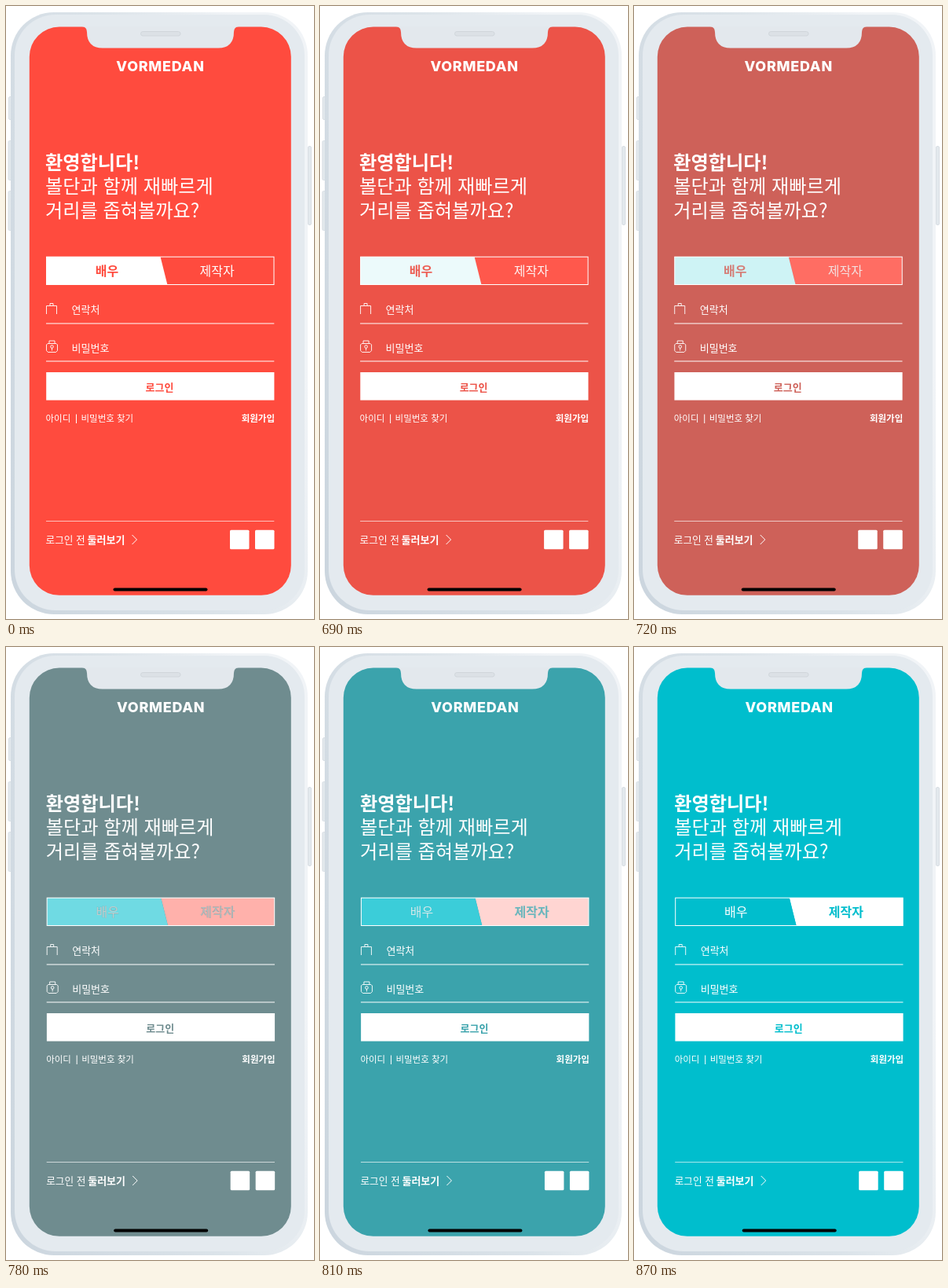
These frames come from a looping animation (392 by 780 pixels, 2400 ms). An HTML page:

```html
<!DOCTYPE html>
<html lang="ko">
<head>
<meta charset="utf-8">
<title>Login theme switch</title>
<style>
  html, body { margin: 0; width: 100%; height: 100%; overflow: hidden; background: #fff; }
  svg { display: block; width: 392px; height: 780px; }
  text { font: 350 13px "Noto Sans CJK KR", "Noto Sans CJK", sans-serif; fill: #fff; white-space: pre; }
  .b { font-weight: 700; }
  .mid { text-anchor: middle; }
  .title { font-size: 24.2px; }
  .tab { font-size: 16px; }
  .small { font-size: 11.5px; }
  .logo { font: 800 18px Inter, sans-serif; letter-spacing: .7px; }
  .line { fill: none; stroke: #fff; }
  .bg { fill: var(--bg); }
  .left { fill: var(--left); }
  .right { fill: var(--right); }
  .labels { isolation: isolate; }
  .actor { opacity: calc(1 - var(--p)); }
  .maker { opacity: var(--p); mix-blend-mode: plus-lighter; }
</style>
</head>
<body>
<svg viewBox="0 0 392 780">
  <defs>
    <linearGradient id="rim" x1="0" y1="1" x2="1" y2=".6">
      <stop offset="0" stop-color="#cbd5de"/>
      <stop offset=".6" stop-color="#dbe3e9"/>
      <stop offset="1" stop-color="#f1f4f7"/>
    </linearGradient>
  </defs>

  <!-- phone -->
  <g fill="#e3e9ed" stroke="#d3dae0" stroke-width=".8">
    <rect x="3.5" y="115.5" width="5" height="29" rx="1.5"/>
    <rect x="3" y="171.5" width="5" height="50" rx="1.5"/>
    <rect x="3" y="235.5" width="5" height="50" rx="1.5"/>
    <rect x="384.5" y="178.5" width="4" height="100" rx="1.5"/>
  </g>
  <rect x="6" y="8" width="378" height="766" rx="55" fill="url(#rim)"/>
  <rect x="11" y="11" width="369" height="758" rx="52" fill="#e4eaef"/>
  <rect class="bg" x="29.8" y="26.6" width="333" height="723.2" rx="38"/>
  <path fill="#e3e8ed" d="M97 26Q103 27 103 33Q103 53.5 123 53.5H270Q290 53.5 290 33Q290 27 296 26Z"/>
  <rect x="171.5" y="32.5" width="50.5" height="5.5" rx="2.7" fill="#dce1e6" stroke="#cdd3d9" stroke-width=".8"/>

  <g id="page">
    <text class="logo mid" x="196.5" y="82.5">VORMEDAN</text>
    <text class="title b" x="50" y="207.5">환영합니다!</text>
    <text class="title" x="50" y="238">볼단과 함께 재빠르게</text>
    <text class="title" x="50" y="268.7">거리를 좁혀볼까요?</text>

    <!-- role switch -->
    <path class="right" d="M196.5 319H341V355H205.5Z"/>
    <path class="left" d="M51.5 319H196.5L205.5 355H51.5Z"/>
    <rect class="line" x="51.5" y="319.2" width="289.5" height="35.3"/>
    <g class="labels">
      <g class="actor">
        <text class="tab b mid bg" x="128.5" y="342.7">배우</text>
        <text class="tab mid" x="268.7" y="342.7">제작자</text>
      </g>
      <g class="maker">
        <text class="tab mid" x="128.5" y="342.7">배우</text>
        <text class="tab b mid bg" x="268.7" y="342.7">제작자</text>
      </g>
    </g>

    <!-- fields -->
    <path class="line" d="M51 404H341.300M51 452H341.300"/>
    <path class="line" stroke-width=".9" d="M51.5 392V381.5H64.5V392M56 381V378.5H60V381"/>
    <path class="line" stroke-width=".9" d="M53 429.5H64L65.5 431V438.5L63.5 440.5H53.5L51.5 438.5V431ZM55 429V426H62V429M58.5 435V438.5"/>
    <circle class="line" cx="58.5" cy="433.5" r="1.8"/>
    <text x="83.5" y="391">연락처</text>
    <text x="83.5" y="439.5">비밀번호</text>

    <rect x="51.200" y="466" width="290.200" height="35.6" fill="#fff"/>
    <text class="b mid bg" x="195.5" y="490">로그인</text>

    <text class="small" x="50.5" y="529">아이디</text>
    <path class="line" d="M89.5 519.5V531"/>
    <text class="small" x="95.5" y="529">비밀번호 찾기</text>
    <text class="small b" x="342" y="529" text-anchor="end">회원가입</text>

    <!-- footer -->
    <path class="line" opacity=".65" d="M51 655.5H341.300"/>
    <text x="50.5" y="683.5" style="font-size: 12.7px">로그인 전</text>
    <text class="b" x="103.5" y="683.5">둘러보기</text>
    <path class="line" d="M160.5 673L166.5 679L160.5 685"/>
    <rect x="285" y="666.7" width="24.5" height="24.5" rx="1.5" fill="#fff"/>
    <rect x="317" y="666.7" width="24.5" height="24.5" rx="1.5" fill="#fff"/>
    <rect x="136.5" y="740.5" width="120" height="4" rx="2" fill="#000"/>
  </g>
</svg>
<script>
  const LOOP = 2400, START = 630, LENGTH = 240, STEP = 30, SHIFT = 1.2;
  const RED = [255, 75, 62], TEAL = [0, 190, 205], WHITE = [255, 255, 255];
  const style = document.documentElement.style;
  const page = document.getElementById("page");

  const mix = (a, b, p) => `rgb(${a.map((v, i) => Math.round(v + (b[i] - v) * p))})`;

  function ease(t) {
    const u = Math.min(1, Math.max(0, (t - START) / LENGTH)) ** 1.3;
    return u * u * (3 - 2 * u);
  }

  function draw(now) {
    const t = Math.floor((now % LOOP) / STEP) * STEP;
    const p = ease(t);
    style.setProperty("--p", p);
    style.setProperty("--bg", mix(RED, TEAL, p));
    style.setProperty("--left", mix(WHITE, TEAL, p));
    style.setProperty("--right", mix(RED, WHITE, p));
    page.setAttribute("transform", `translate(${p * SHIFT} 0)`);
  }

  let begin;
  function tick(now) {
    begin ??= now;
    draw(now - begin);
    requestAnimationFrame(tick);
  }
  draw(0);
  requestAnimationFrame(tick);
</script>
</body>
</html>
```
